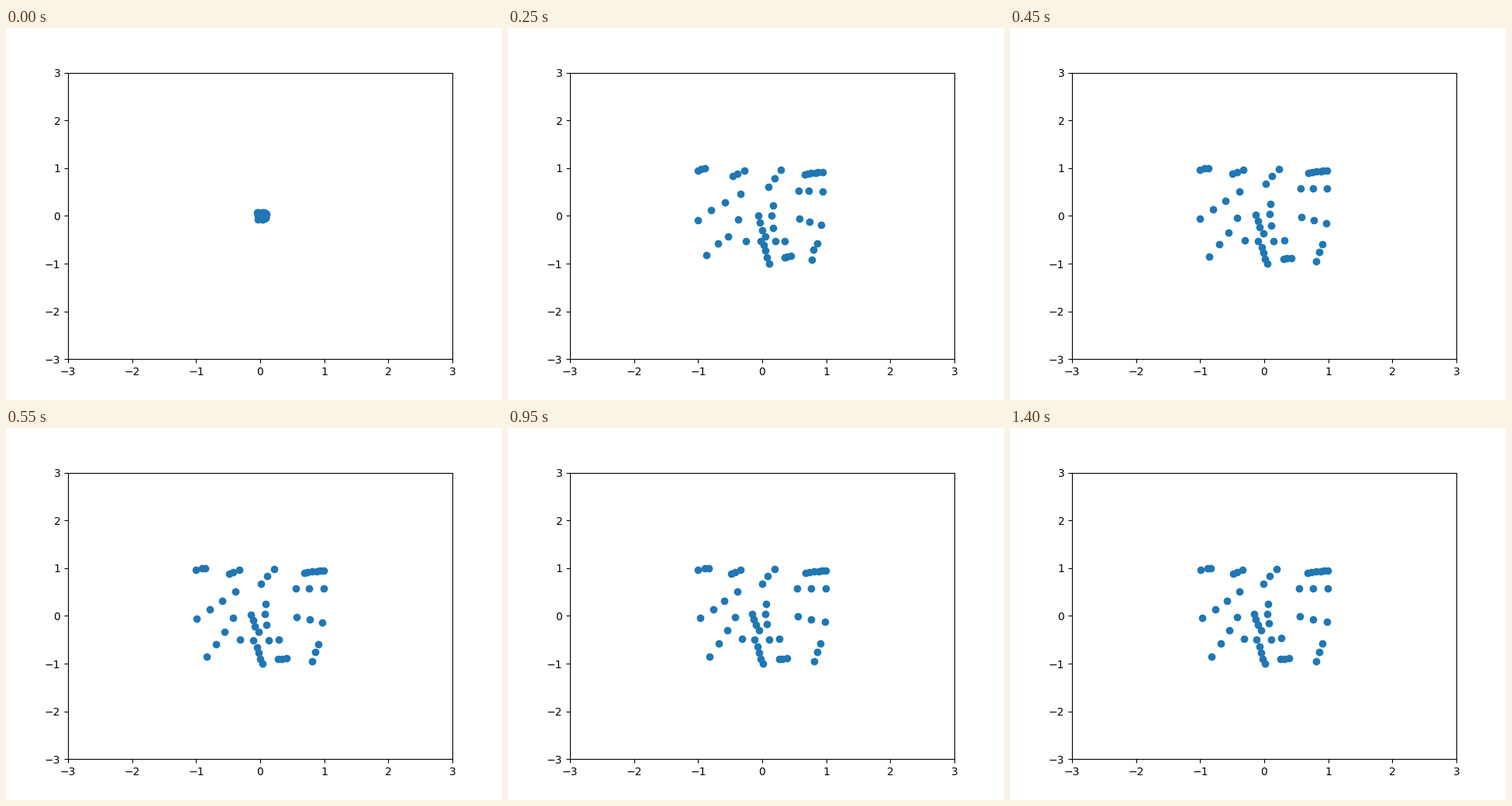
A matplotlib script that plays this animation: 640 px wide and 480 px high, repeating every 4 s.

```python
import numpy as np
import matplotlib.pyplot as plt
from matplotlib.animation import FuncAnimation

STEP = 50
FRAMES = 80

# Short strands of evenly spaced dots: count, first point, last point
STRANDS = [
    (3, (-.99, .97), (-.82, 1)), (3, (-.48, .88), (-.34, .95)),
    (3, (-.01, .66), (.21, .97)), (6, (.68, .91), (1, .97)),
    (3, (.55, .57), (1, .56)), (3, (.05, .26), (.06, -.17)),
    (4, (-.15, .04), (-.07, -.30)), (4, (-.39, .51), (-.95, -.06)),
    (4, (-.42, -.03), (-.82, -.86)), (4, (-.31, -.49), (.28, -.49)),
    (4, (-.07, -.66), (.02, -1)), (3, (.25, -.93), (.39, -.88)),
    (3, (.57, 0), (.98, -.11)), (3, (.90, -.58), (.81, -.95)),
]

rest = np.vstack([np.linspace(a, b, n) for n, a, b in STRANDS])
rng = np.random.default_rng(4)
rest = np.clip(rest + rng.normal(0, .01, rest.shape), -.996, .996)
start = rng.uniform((-.05, -.075), (.095, .075), rest.shape)
drive = np.arctanh(rest)

# On the way out the middle sways right, the sides left, the lower band dips
x, y = rest.T
sway = np.column_stack([.12 * np.cos(2.5 * (x - .2)),
                        -.16 * np.exp(-((y + .3) / .25) ** 2)])


def logistic(t, mid, width):
    return 1 / (1 + np.exp(-(t - mid) / width))


def places(t):
    low = logistic(0, 145, 50)
    grow = (logistic(t, 145, 50) - low) / (1 - low)
    detour = logistic(t, 130, 30) * np.exp((250 - t) / 190) * min(1, t / STEP)
    pos = np.tanh(grow * drive) + detour * sway + (1 - grow) ** 3 * start
    return np.clip(pos, -1, 1)


fig, ax = plt.subplots(figsize=(6.4, 4.8), dpi=100)
ax.set_xlim(-3, 3)
ax.set_ylim(-3, 3)
dots = ax.scatter(*places(0).T)


def draw(k):
    dots.set_offsets(places(k * STEP))
    return dots,


anim = FuncAnimation(fig, draw, frames=FRAMES, interval=STEP,
                     repeat=True, repeat_delay=0)
plt.show()
```
